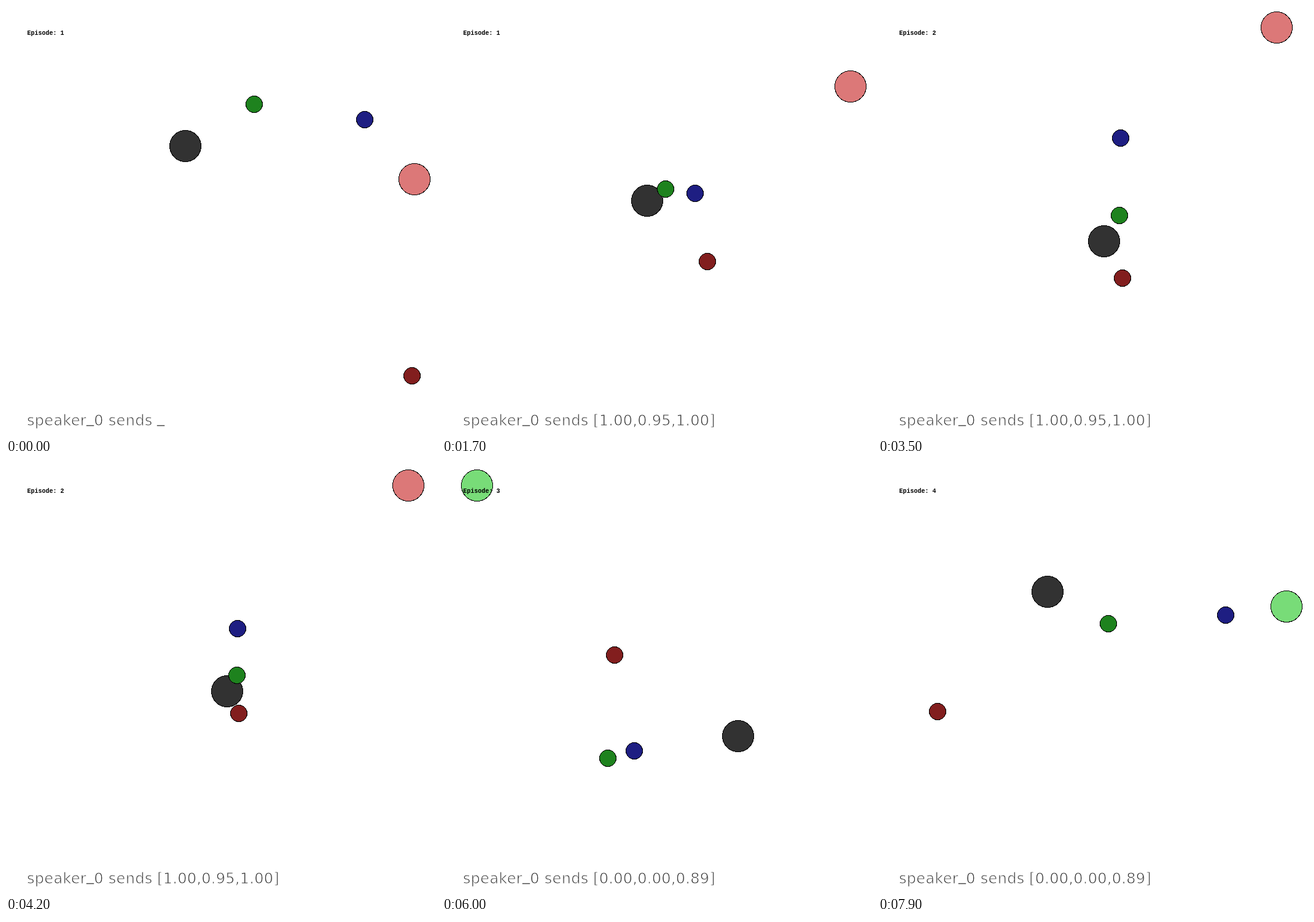
Write an HTML page that moves like this. It is 700x700 px and loops after 8000 ms.

```html
<!DOCTYPE html>
<html lang="en">
<head>
<meta charset="utf-8">
<title>Speaker and listener</title>
<style>
  html, body { margin: 0; width: 100%; height: 100%; overflow: hidden; background: #fff; }
  svg { display: block; width: 700px; height: 700px; }
  circle { stroke: #000; stroke-width: 1; shape-rendering: crispEdges; }
  text { white-space: pre; }
  /* The white outline thins the letters to hairlines */
  .said { font: 400 24px "DejaVu Sans", sans-serif; letter-spacing: 0.3px; fill: #333; stroke: #fff; stroke-width: 0.95px; }
  .low { stroke: none; fill: #666; }
  .title { font: bold 10px "Liberation Mono", monospace; fill: #000; }
</style>
</head>
<body>
<svg id="stage" viewBox="0 0 700 700"></svg>
<script>
const STEP_MS = 100, LOOP_MS = 8000, EPISODE_STEPS = 25, DAMPING = 0.25;

const RED = "rgb(130,30,30)", GREEN = "rgb(30,130,30)", BLUE = "rgb(30,30,130)", GRAY = "rgb(50,50,50)";
const RED_GOAL = { color: "rgb(220,120,120)", word: "[1.00,0.95,1.00]" };
const GREEN_GOAL = { color: "rgb(120,220,120)", word: "[0.00,0.00,0.89]" };

// push: top speed per step on each axis; delay: steps before that push begins
const episodes = [
  { goal: RED_GOAL, speaker: [-63.5, -134.5], marks: [[346.5, 280.5], [60.5, -210.5], [260.5, -182.5]],
    start: [350, -74.5], push: [73.7, -74.8], delay: [1, 2.93] },
  { goal: RED_GOAL, speaker: [48.5, 89.2], marks: [[128.5, 245.5], [114.5, -19.5], [118.5, -350]],
    start: [302.8, -342.5], push: [77.4, -77.4], delay: [1, 1] },
  { goal: GREEN_GOAL, speaker: [350, 248.5], marks: [[-179.5, -99.9], [-207.5, 343.5], [-95.5, 312.5]],
    start: [-206.5, -267.5], push: [-90.4, -90.4], delay: [1, 1] },
  { goal: GREEN_GOAL, speaker: [-81.5, -156.5], marks: [[-280.5, 59.5], [28.5, -99.5], [240.5, -114.5]],
    start: [269, -86.5], push: [64, -64], delay: [1, 2] }
];

const stage = document.getElementById("stage");

function add(tag, attrs, parent = stage) {
  const el = document.createElementNS("http://www.w3.org/2000/svg", tag);
  for (const key in attrs) el.setAttribute(key, attrs[key]);
  return parent.appendChild(el);
}

// Underscores sit on the baseline, unthinned
function write(el, content) {
  el.textContent = "";
  let raised = false;
  for (const part of content.split(/(_)/).filter(Boolean)) {
    const low = part === "_";
    const dy = low ? -5 : raised ? 5 : 0;
    add("tspan", { dy, class: low ? "low" : "" }, el).textContent = part;
    raised = low;
  }
}

const disc = (r, fill) => add("circle", { r: r - 0.5, fill });

const speaker = disc(26, GRAY);
const listener = disc(26, GRAY);
write(add("text", { class: "said", x: 34, y: 682.5 }), "speaker_0 sends");
const word = add("text", { class: "said", x: 246, y: 682.5 });
const marks = [RED, GREEN, BLUE].map(color => disc(14, color));
const title = add("text", { class: "title", x: 34.5, y: 47 });

// Distance covered after n steps of a constant push against damping
function travel(n) {
  if (n <= 0) return 0;
  const keep = 1 - DAMPING;
  return n - keep / DAMPING * (1 - keep ** n);
}

// The camera keeps the farthest body at 90% of the half stage
const project = (v, range) => Math.floor(Math.floor(v / range * 350) * 0.9 + 350);

function place(el, [x, y], range) {
  el.setAttribute("cx", project(x, range));
  el.setAttribute("cy", project(y, range));
}

function draw(tick) {
  const index = Math.floor(tick / EPISODE_STEPS);
  const step = tick % EPISODE_STEPS;
  const ep = episodes[index];
  const pos = ep.start.map((v, i) => v + ep.push[i] * travel(step - ep.delay[i]));
  const range = Math.max(...[pos, ep.speaker, ...ep.marks].flat().map(Math.abs));

  place(speaker, ep.speaker, range);
  place(listener, pos, range);
  listener.setAttribute("fill", ep.goal.color);
  marks.forEach((el, i) => place(el, ep.marks[i], range));
  write(word, step ? ep.goal.word : "_");
  title.textContent = "Episode: " + (index + 1);
}

const begin = performance.now();
let shown = -1;

function play() {
  const tick = Math.floor((performance.now() - begin) % LOOP_MS / STEP_MS);
  if (tick !== shown) draw(shown = tick);
  requestAnimationFrame(play);
}
play();
</script>
</body>
</html>
```
